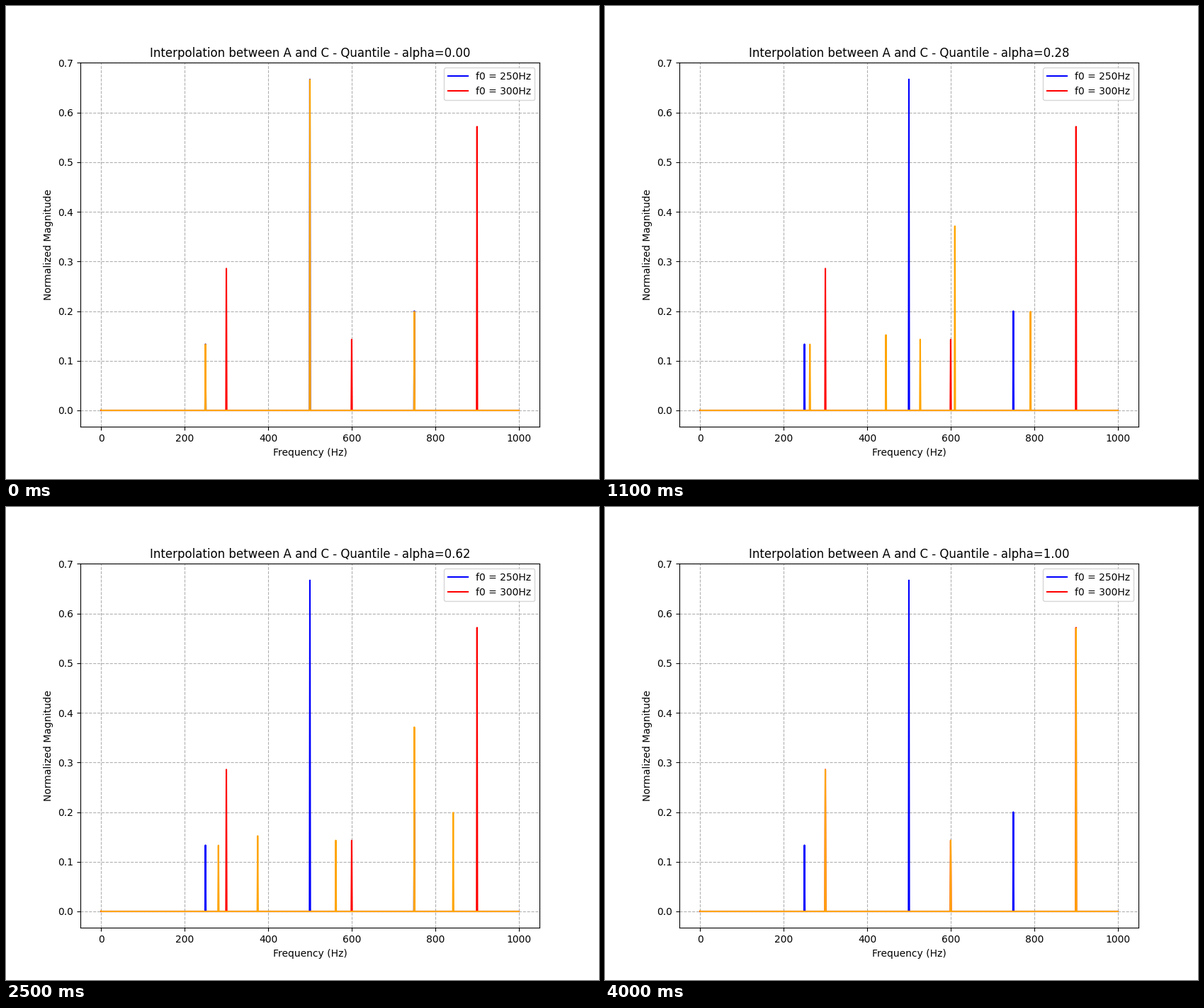
A matplotlib script for the animation above (4.1 s loop, 837 by 669 pixels).

```python
import numpy as np
import matplotlib.pyplot as plt
from matplotlib.animation import FuncAnimation

WIDTH, HEIGHT, DPI = 837, 669, 100
STEPS = 40
SAMPLES = 1000

freqs = np.arange(1001)


def spectrum(peaks):
    """Normalized magnitudes with one-bin spikes at the given frequencies."""
    mags = np.zeros(len(freqs))
    for freq, weight in peaks.items():
        mags[freq] = weight
    return mags / mags.sum()


def quantiles(mags):
    """Frequency at evenly spaced levels of the cumulative spectrum."""
    levels = np.linspace(0, 1, SAMPLES)[:-1]
    return np.searchsorted(np.cumsum(mags), levels)


spec_a = spectrum({250: 2, 500: 10, 750: 3})
spec_c = spectrum({300: 2, 600: 1, 900: 4})
quant_a, quant_c = quantiles(spec_a), quantiles(spec_c)


def blend(step):
    """Histogram of the quantile functions mixed at step / STEPS."""
    bins = quant_a + (quant_c - quant_a) * step // STEPS
    return np.bincount(bins, minlength=len(freqs)) / SAMPLES


# The tiny offset keeps the pixel size from being truncated.
fig, ax = plt.subplots(figsize=((WIDTH + 1e-4) / DPI, (HEIGHT + 1e-4) / DPI),
                       dpi=DPI)
ax.plot(freqs, spec_a, color="blue", label="f0 = 250Hz")
ax.plot(freqs, spec_c, color="red", label="f0 = 300Hz")
mix_line, = ax.plot(freqs, blend(0), color="orange")
ax.set_xlim(-50, 1050)
ax.set_ylim(-0.05 * spec_a.max(), 1.05 * spec_a.max())
ax.set_xlabel("Frequency (Hz)")
ax.set_ylabel("Normalized Magnitude")
ax.grid(True, linestyle="--")
ax.legend(loc="upper right")
title = ax.set_title("")


def update(step):
    mix_line.set_ydata(blend(step))
    title.set_text(
        f"Interpolation between A and C - Quantile - alpha={step / STEPS:.2f}")
    return mix_line, title


anim = FuncAnimation(fig, update, frames=STEPS + 1, interval=100,
                     repeat=True, repeat_delay=0, blit=False)
plt.show()
```
